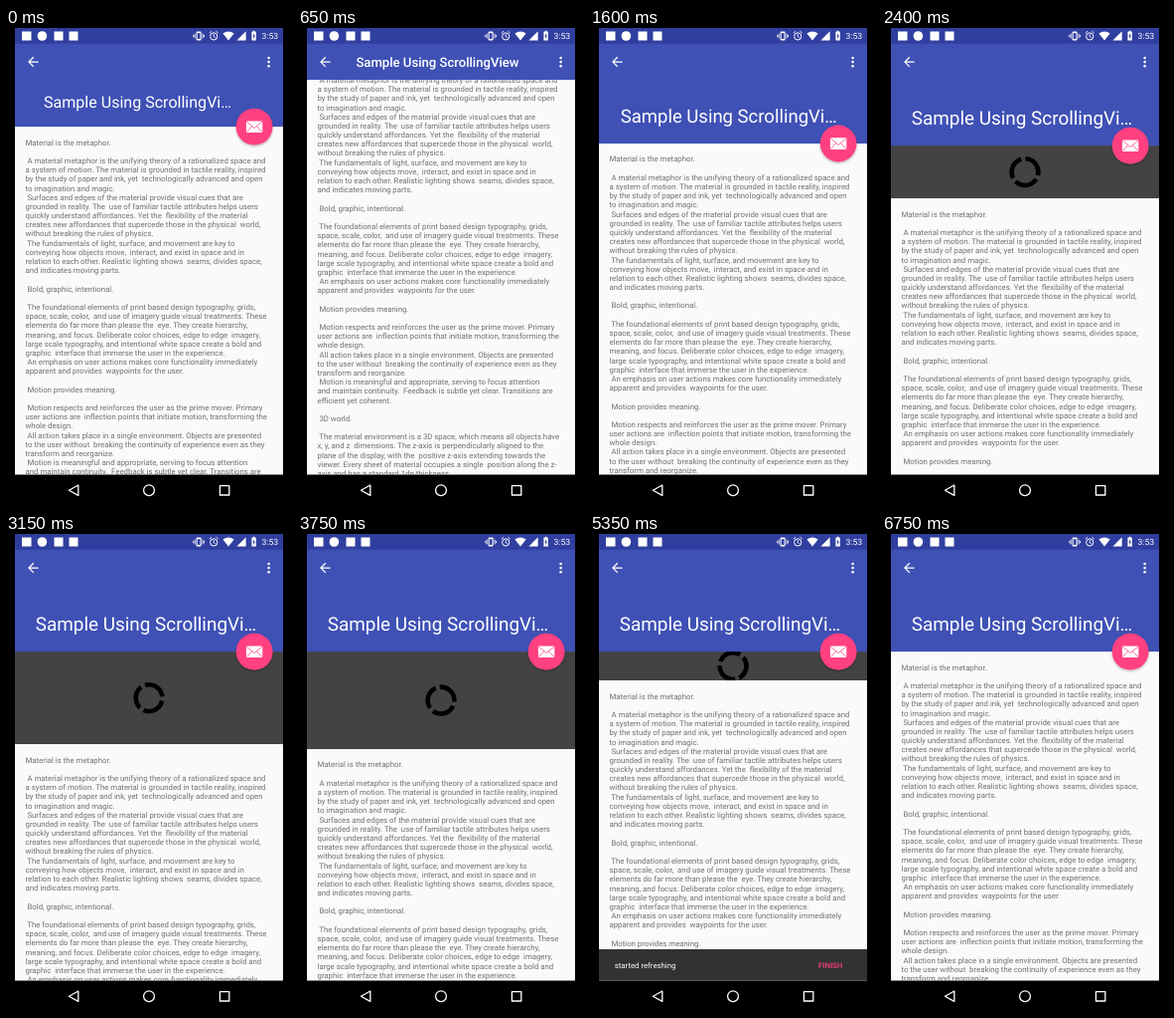
Animation of 288 by 480 pixels, one loop 7.05 s. Source, as an HTML page:

```html
<!DOCTYPE html>
<html lang="en">
<head>
<meta charset="utf-8">
<title>Scrolling view with pull to refresh</title>
<style>
  html, body { margin: 0; width: 100%; height: 100%; overflow: hidden; background: #000; }
  svg { display: block; width: 100%; height: 100%; }
  text {
    font-family: Roboto, "Noto Sans", sans-serif;
    text-rendering: geometricPrecision;
    white-space: pre;
  }
  #lines { font-size: 7.81px; fill: #707070; }
  #snack text { font-size: 7.81px; }
  .line { fill: none; stroke: #fff; }
</style>
</head>
<body>
<svg viewBox="0 0 288 480">
  <defs>
    <clipPath id="screen"><rect x="9" y="0" width="270" height="448.5"/></clipPath>
    <clipPath id="gap"><rect id="gapBox" x="9" y="118.1" width="270" height="0"/></clipPath>
    <filter id="shade" x="-30%" y="-30%" width="160%" height="170%">
      <feDropShadow dx="0" dy="1.2" stdDeviation="1.2" flood-color="#000" flood-opacity=".3"/>
    </filter>
  </defs>
  <rect width="288" height="480"/>

  <g clip-path="url(#screen)">
    <rect x="9" width="270" height="449" fill="#fafafa"/>
    <g id="lines"></g>

    <g clip-path="url(#gap)">
      <rect x="9" y="118" width="270" height="140" fill="#434343"/>
      <circle id="ring" r="13.4" fill="none" stroke="#000" stroke-width="4.6"
        pathLength="360" stroke-dasharray="102 18"/>
    </g>

    <rect id="bar" x="9" width="270" fill="#3f51b5"/>
    <text id="title" fill="#fff"></text>
    <path class="line" stroke-width="1.3" d="M32.6 34.1H23.2M27.8 29.3L23 34.1L27.8 38.9"/>
    <g fill="#fff">
      <circle cx="264.6" cy="30" r="1.3"/>
      <circle cx="264.6" cy="34.1" r="1.3"/>
      <circle cx="264.6" cy="38.2" r="1.3"/>
    </g>

    <g id="fab">
      <circle r="18.4" fill="#ff4081" filter="url(#shade)"/>
      <rect x="-8.2" y="-5.7" width="16.4" height="11.6" rx="1" fill="#fff"/>
      <path d="M-7.8 -5L0 1.4L7.8 -5M-7.6 5.2L-2.4 -.4M7.6 5.2L2.4 -.4"
        fill="none" stroke="#ff4081" stroke-opacity=".8" stroke-width="1"/>
    </g>

    <g id="snack">
      <rect x="9" y="417" width="270" height="32" fill="#323232"/>
      <g id="label">
        <text x="24.75" y="435.6" fill="#fff">started refreshing</text>
        <text x="229.9" y="435.6" fill="#ff4081" font-weight="500">FINISH</text>
      </g>
    </g>

    <!-- status bar -->
    <rect x="9" width="270" height="15.75" fill="#303f9f"/>
    <g fill="#fff">
      <rect x="16" y="3.5" width="9.5" height="9"/>
      <circle cx="36.4" cy="8" r="4.8"/>
      <rect x="48.5" y="3.5" width="9" height="9"/>
      <rect x="63.5" y="3.5" width="9" height="9"/>
      <rect x="191.6" y="3.6" width="5" height="8.8" rx=".8"/>
      <path d="M218.4 5.6Q224 1.4 229.6 5.6L224 12.5Z"/>
      <path d="M241.6 3.2V12.4H232.4Z"/>
      <path d="M247.4 3.8H248.6V2.8H250.6V3.8H251.8V12.6H247.4Z"/>
      <text x="257.6" y="11.3" font-size="8.6">3:53</text>
    </g>
    <rect x="192.7" y="5.1" width="2.8" height="5.8" fill="#303f9f"/>
    <path d="M250 5L248.4 8.6H249.4V11.4L250.9 7.8H250Z" fill="#303f9f"/>
    <path class="line" stroke-width=".9" d="M190.2 5.6V10.4M188.7 6.8V9.2M198 5.6V10.4M199.5 6.8V9.2"/>
    <circle class="line" cx="209.2" cy="8.4" r="3.6" stroke-width="1"/>
    <path class="line" stroke-width=".9" d="M209.2 6.2V8.6L210.8 9.6M204.8 5L207 3.2M213.6 5L211.4 3.2"/>
  </g>

  <!-- navigation bar -->
  <g class="line" stroke-width="1.3" stroke-linejoin="round">
    <path d="M72.8 459V469.4L63.4 464.2Z"/>
    <circle cx="144" cy="464.2" r="5.4"/>
    <rect x="215.4" y="459.6" width="9.4" height="9.4"/>
  </g>
</svg>

<script>
const LOOP = 7050, STEP = 50;
const BAR_MAX = 118.125, BAR_MIN = 52, FAB_LIMIT = 89.25;
const LINE = 9.1875, REST = 52.5;

const copy = `Material is the metaphor.

 A material metaphor is the unifying theory of a rationalized space and
a system of motion. The material is grounded in tactile reality, inspired
by the study of paper and ink, yet  technologically advanced and open
to imagination and magic.
 Surfaces and edges of the material provide visual cues that are
grounded in reality. The  use of familiar tactile attributes helps users
quickly understand affordances. Yet the  flexibility of the material
creates new affordances that supercede those in the physical  world,
without breaking the rules of physics.
 The fundamentals of light, surface, and movement are key to
conveying how objects move,  interact, and exist in space and in
relation to each other. Realistic lighting shows  seams, divides space,
and indicates moving parts.

 Bold, graphic, intentional.

 The foundational elements of print based design typography, grids,
space, scale, color,  and use of imagery guide visual treatments. These
elements do far more than please the  eye. They create hierarchy,
meaning, and focus. Deliberate color choices, edge to edge  imagery,
large scale typography, and intentional white space create a bold and
graphic  interface that immerse the user in the experience.
 An emphasis on user actions makes core functionality immediately
apparent and provides  waypoints for the user.

 Motion provides meaning.

 Motion respects and reinforces the user as the prime mover. Primary
user actions are  inflection points that initiate motion, transforming the
whole design.
 All action takes place in a single environment. Objects are presented
to the user without  breaking the continuity of experience even as they
transform and reorganize.
 Motion is meaningful and appropriate, serving to focus attention
and maintain continuity.  Feedback is subtle yet clear. Transitions are
efficient yet coherent.

 3D world.

 The material environment is a 3D space, which means all objects have
x, y, and z  dimensions. The z-axis is perpendicularly aligned to the
plane of the display, with the  positive z-axis extending towards the
viewer. Every sheet of material occupies a single  position along the z-
axis and has a standard 1dp thickness.`;

const $ = id => document.getElementById(id);
const set = (el, attrs) => { for (const k in attrs) el.setAttribute(k, attrs[k]); };
const clamp = v => Math.max(0, Math.min(1, v));
const mix = (a, b, f) => a + (b - a) * f;
const easeOut = f => 1 - (1 - f) ** 2;

copy.split('\n').forEach((line, i) => {
  const text = document.createElementNS('http://www.w3.org/2000/svg', 'text');
  set(text, { x: 19.5, y: 136.6 + i * LINE });
  text.textContent = line;
  $('lines').append(text);
});

// Smooth curve through [time, value] points that never overshoots.
function curve(pts) {
  const slope = i => (pts[i + 1][1] - pts[i][1]) / (pts[i + 1][0] - pts[i][0]);
  const tangent = pts.map((p, i) => {
    if (!i || i === pts.length - 1) return i ? 0 : slope(0);
    const a = slope(i - 1), b = slope(i);
    return a * b > 0 ? 2 * a * b / (a + b) : 0;
  });
  return t => {
    if (t <= pts[0][0]) return pts[0][1];
    const i = pts.findIndex(p => p[0] >= t) - 1;
    if (i < 0) return pts[pts.length - 1][1];
    const [t0, v0] = pts[i], [t1, v1] = pts[i + 1];
    const d = t1 - t0, u = (t - t0) / d, w = 1 - u;
    return v0 * (1 + 2 * u) * w * w + v1 * u * u * (3 - 2 * u)
      + d * u * w * (tangent[i] * w - tangent[i + 1] * u);
  };
}

const scrollAt = curve([[0, 19], [200, 53], [400, 84], [650, 100], [750, 96],
  [850, 72], [1000, 27], [1200, 14], [1500, 4], [1800, 0]]);
const pullAt = curve([[2200, 0], [2400, 53], [2700, 79], [3150, 93], [3700, 98],
  [3900, 96], [4100, 71], [4350, 56.5], [4650, REST], [5200, REST], [5400, 21], [5650, 0]]);
const barAt = t => Math.max(BAR_MIN, BAR_MAX - scrollAt(t));

// The button shrinks or grows over 200 ms once the bar passes the limit.
function fabScale(t) {
  let k = 1;
  for (let u = 0; u <= Math.min(t, 2000); u += STEP)
    k = clamp(k + (barAt(u) > FAB_LIMIT ? .25 : -.25));
  return k;
}

function draw(t) {
  const scroll = scrollAt(t), pull = pullAt(t), bar = barAt(t);
  const f = (BAR_MAX - bar) / (BAR_MAX - BAR_MIN), closed = f >= 1;

  set($('lines'), { transform: `translate(0 ${pull - scroll})` });
  set($('bar'), { height: bar });
  set($('title'), {
    x: mix(29.8, 58.4, f), y: mix(97.1, 38.6, f),
    'font-size': mix(18.9, 13.125, easeOut(f)),
    'font-weight': closed ? 500 : 400
  });
  $('title').textContent = closed ? 'Sample Using ScrollingView' : 'Sample Using ScrollingVi…';
  set($('fab'), { transform: `translate(250.1 ${bar}) scale(${fabScale(t)})` });

  set($('gapBox'), { height: pull });
  const turn = 20 + pull * 2.5 + Math.max(0, t - 4050) * .36;
  set($('ring'), { transform: `translate(144 ${BAR_MAX + pull / 2}) rotate(${turn})` });

  const shown = t < 6750 ? easeOut(clamp((t - 3950) / 250)) : 0;
  set($('snack'), { transform: `translate(0 ${32 * (1 - shown)})` });
  set($('label'), { opacity: clamp((t - 4020) / 180) });
}

const start = performance.now();
function tick() {
  const t = (performance.now() - start) % LOOP;
  draw(Math.floor(t / STEP) * STEP);
  requestAnimationFrame(tick);
}
tick();
</script>
</body>
</html>
```
